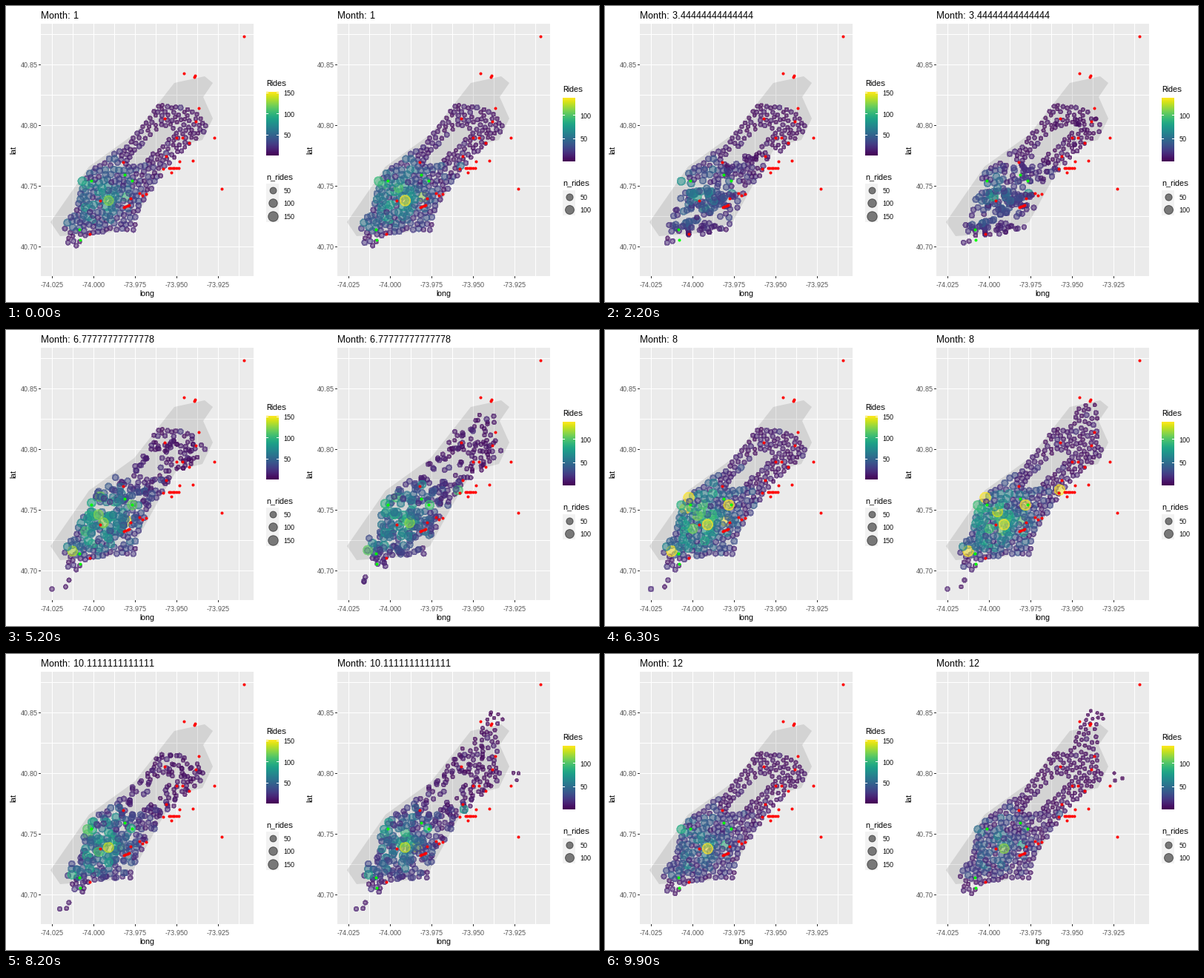
Write a matplotlib script that moves like this. It is 800x400 px and loops after 10000 ms.

```python
import numpy as np
import matplotlib.pyplot as plt
from matplotlib.animation import FuncAnimation
from matplotlib.patches import Polygon, Rectangle
from matplotlib.path import Path

FRAMES, MONTHS, STEPS = 100, 12, 9
PT = 0.72  # points per pixel at 100 dpi
plt.rcParams.update({"font.family": "Liberation Sans",
                     "text.hinting": "native", "text.hinting_factor": 1})
rng = np.random.default_rng(11)

# Key outlines in pixels of the left panel
LAND = [(60, 292), (112, 217), (173, 173), (227, 104), (268, 95), (279, 104),
        (266, 123), (279, 152), (265, 181), (230, 190), (205, 232), (172, 292),
        (140, 306), (73, 311)]
CITY = [(78, 299), (84, 322), (95, 324), (112, 307), (172, 303), (187, 260),
        (226, 207), (250, 185), (273, 166), (254, 140), (208, 130), (168, 183),
        (103, 233), (95, 272)]
PARK = [(160, 212), (180, 217), (231, 169), (212, 160)]
UPTOWN = [(222, 140), (240, 100), (256, 75), (275, 84), (263, 100), (266, 150)]
HARBOR = [(62, 350), (80.5, 347), (85, 338)]
EAST = [(287, 161), (288, 171), (298, 168)]
HUBS = [(112, 228), (88, 296), (168, 238), (212, 214)]

RED = [(320, 40), (239, 90), (254, 93), (253, 95), (259, 137), (213, 151),
       (255, 155), (280, 177), (229, 177), (237, 177), (246, 184), (215, 202),
       (251, 208), (233, 209), (211, 219), (222, 224), (157, 210), (290, 246),
       (188, 253), (179, 252), (183, 255), (167, 259), (126, 262), (112, 307)]
RED += [(219 + 2.6 * k, 218) for k in range(6)]
RED += [(158 + 2.5 * k, 271 - k) for k in range(4)]
GREEN = [(114, 235), (159, 227), (169, 235), (98, 301), (99, 315)]


def scatter_in(area, gap, tries, taken=(), hole=None):
    """Random points at least `gap` apart inside `area`, outside `hole`."""
    pts = [tuple(p) for p in taken]
    skip = len(pts)
    cand = rng.uniform(np.min(area, 0), np.max(area, 0), (tries, 2))
    ok = Path(area).contains_points(cand)
    if hole:
        ok &= ~Path(hole).contains_points(cand)
    for p in cand[ok]:
        if not pts or np.hypot(*(np.array(pts) - p).T).min() > gap:
            pts.append(tuple(p))
    return np.array(pts[skip:])


city = scatter_in(CITY, 5.2, 9000, hole=PARK)
uptown = scatter_in(UPTOWN, 6, 1500, taken=city)
pos = np.vstack([city, uptown, HARBOR, EAST])
kind = np.repeat(np.arange(4), [len(city), len(uptown), 3, 3])
X, Y = pos.T


def bump(cx, cy, s):
    return np.exp(-((X - cx) ** 2 + (Y - cy) ** 2) / (2 * s * s))


# Ride density: busy midtown, a broad halo, quiet outskirts
weight = (0.08 + 0.17 * bump(125, 260, 55) + 0.42 * bump(134, 252, 26)
          + 0.2 * bump(92, 262, 22)) * np.exp(rng.normal(0, 0.45, len(pos)))
weight[kind == 1] *= np.clip((Y[kind == 1] - 70) / 70, 0.1, 1)
weight[kind == 3] = 0.01
hubs = [np.argmin(np.hypot(X - x, Y - y)) for x, y in HUBS]

# Row order winds through latitude bands, so neighbours trade places
band = Y // 24
row_key = (-300 * band + np.where(band % 2, X, -X)
           + rng.normal(0, 40, len(pos)))
uptown_from = np.interp(Y, [90, 130], [8, 4])


def season(m):
    return np.exp(-((m - 7) / 2.8) ** 2)


def month_rows(side, m, top):
    """Rows (x, y, rides) of one month; two stations sit out each month."""
    level = ((58, 42)[side] + 50 * season(m) + (14, 38)[side] * np.exp(-m))
    n = 1 + level * weight * np.exp(rng.normal(0, 0.15, len(pos)))
    n[hubs] = level * (0.6 + 0.9 * season(m))
    if side == 0:
        n[hubs[-1]] = 20
    on = kind == 0
    on |= (kind == 2) & (4 + 2 * side <= m) & (m <= 9)
    if side:
        on |= (kind == 1) & (m >= uptown_from) | (kind == 3) & (m >= 8)
    on[rng.choice(len(city), 2, replace=False)] = False
    rows = np.flatnonzero(on)
    rows = rows[np.argsort(row_key[rows])]
    return np.column_stack([pos[rows], np.clip(n[rows], 1, top)])


def radius(n, top):
    size = 1 + 5 * np.sqrt((np.asarray(n) - 1) / (top - 1))
    return 0.375 * (size * 2.845 + 0.94)


def area(r):
    return (2 * np.asarray(r) * PT) ** 2


fig = plt.figure(figsize=(8, 4), dpi=100, facecolor="white")
ax = fig.add_axes([0, 0, 1, 1])


def text(x, y, s, size, color="black", ha="left"):
    return ax.text(x, y, s, fontsize=size * PT, color=color, ha=ha,
                   va="baseline")


def box(x, y, w, h, color, z=1):
    ax.add_patch(Rectangle((x, y), w, h, fc=color, lw=0, zorder=z))


def dots(pts, dx, color):
    ax.scatter(*(np.array(pts) + [dx + 0.5, 0.5]).T, s=area(2), c=color, lw=0,
               zorder=5, antialiased=False)


class Panel:
    def __init__(self, side, top, bar_y, key_y, sizes):
        self.dx, self.top = 400 * side, top
        self.months = [month_rows(side, m, top) for m in range(MONTHS)]
        self.frame()
        self.legends(bar_y, key_y, sizes)
        self.title = text(self.dx + 47, 17, "", 13)
        self.pts = ax.scatter([], [], lw=PT, zorder=4, antialiased=False)
        dots(RED, self.dx, "#FF0000")
        dots(GREEN, self.dx, "#00FF00")

    def frame(self):
        dx = self.dx
        box(dx + 47, 24, 287, 341, "#EBEBEB", 0)
        for k in range(10):
            x = dx + int(62 + 28.05 * k)
            box(x, 24, 1, 341, "white")
            if k % 2 == 0:
                box(x, 365, 1, 3, "#333333")
                text(x, 380, f"{-74.025 + 0.0125 * k:.3f}", 9.1, "#4D4D4D",
                     "center")
        for k in range(8):
            y = 38 + 41 * k
            box(dx + 47, y, 287, 1, "white")
            if k % 2:
                box(dx + 44, y, 3, 1, "#333333")
                text(dx + 43, y + 4, f"{40.875 - 0.025 * k:.2f}", 9.1,
                     "#4D4D4D", "right")
        ax.add_patch(Polygon(np.array(LAND) + [dx, 0], fc="black", alpha=0.1,
                             lw=0, zorder=2))
        text(dx + 190.5, 392, "long", 11, ha="center")
        ax.text(dx + 15, 195, "lat", fontsize=11 * PT, rotation=90,
                ha="right", va="center")

    def legends(self, bar_y, key_y, sizes):
        x, top = self.dx + 351, self.top
        text(x, bar_y - 8, "Rides", 11)
        ax.imshow(np.linspace(1, 0, 256)[:, None], cmap="viridis",
                  extent=(x, x + 17, bar_y + 86, bar_y), aspect="auto",
                  interpolation="bilinear", zorder=1)
        text(x, key_y - 15, "n_rides", 11)
        for i, n in enumerate(sizes):
            y = bar_y + 86 * (top - n) / (top - 1)
            for tick in (x, x + 14):
                box(tick, int(y), 3, 1, "white", 2)
            text(x + 23.5, y + 4, n, 9.1)
            y = key_y + 17.3 * i
            box(x, y - 8.64, 17.3, 17.3, "#F2F2F2", 0)
            ax.scatter(x + 8.6, y, s=area(radius(n, top)), lw=PT, zorder=4,
                       fc=(0, 0, 0, 0.5), ec=(0, 0, 0, 0.5),
                       antialiased=False)
            text(x + 23.5, y + 4, n, 9.1)

    def draw(self, i):
        m, step = divmod(i, STEPS)
        now = self.months[m]
        if step:
            nxt = self.months[m + 1]
            k = min(len(now), len(nxt))
            now = now[:k] + (nxt[:k] - now[:k]) * step / STEPS
        n = now[:, 2]
        colors = plt.cm.viridis((n - 1) / (self.top - 1), alpha=0.5)
        self.pts.set_offsets(now[:, :2] + [self.dx, 0])
        self.pts.set_sizes(area(radius(n, self.top)))
        self.pts.set_facecolor(colors)
        self.pts.set_edgecolor(colors)
        self.title.set_text(f"Month: {1 + i / STEPS:.15g}")
        return self.pts, self.title


panels = [Panel(0, 152, 116, 249, (50, 100, 150)),
          Panel(1, 138, 124, 257.5, (50, 100))]
ax.set(xlim=(0, 800), ylim=(400, 0))
ax.axis("off")


def update(i):
    return [a for p in panels for a in p.draw(i)]


anim = FuncAnimation(fig, update, frames=FRAMES, interval=100, repeat=True,
                     repeat_delay=0, blit=False)
plt.show()
```
